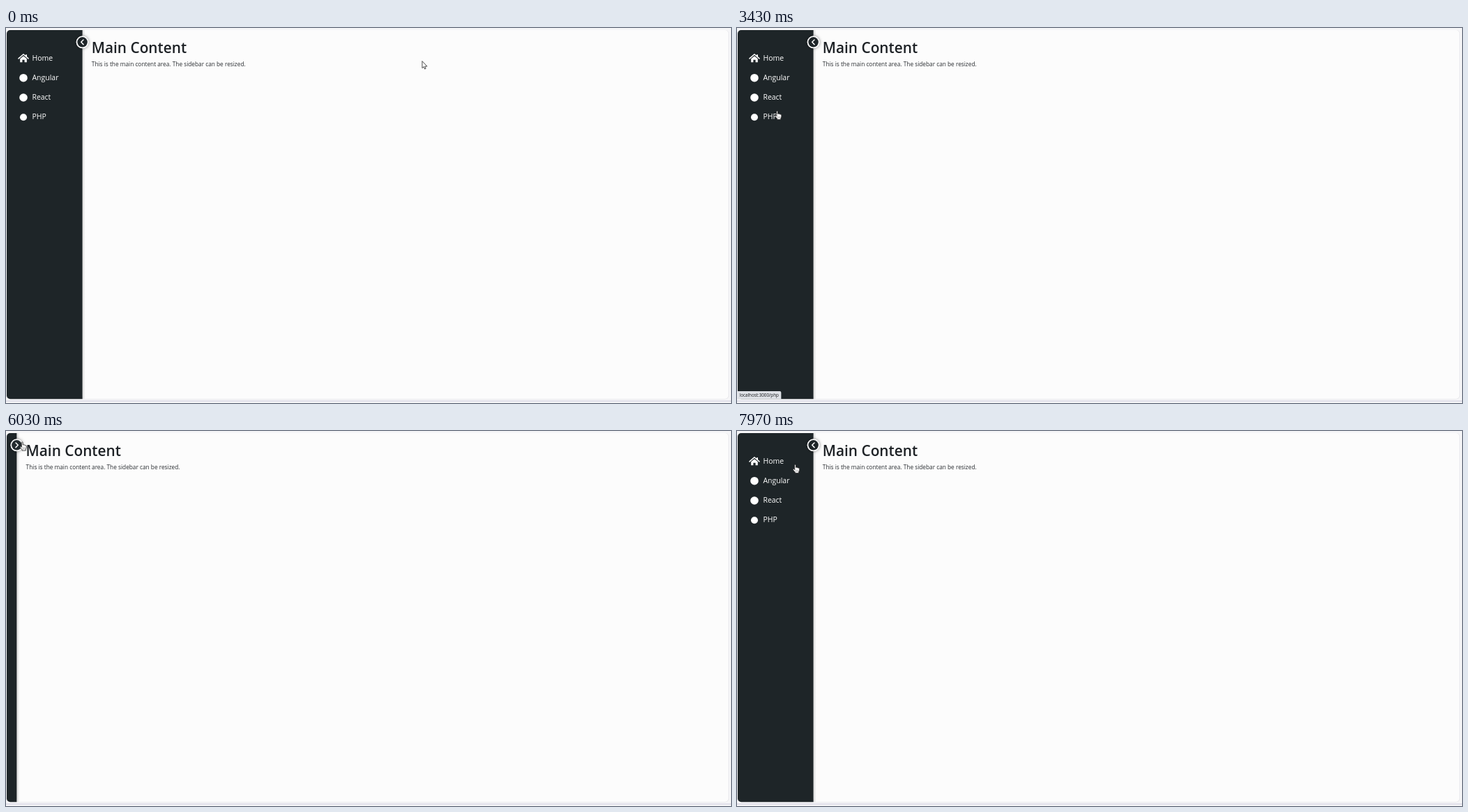
An HTML page with a canvas that plays this animation: 1040 px wide and 539 px high, repeating every 8000 ms.

```html
<!DOCTYPE html>
<html lang="en">
<head>
<meta charset="utf-8">
<title>Resizable sidebar</title>
<style>
html, body { margin: 0; width: 100%; height: 100%; overflow: hidden; background: #f6f6f8; }
canvas { display: block; }
</style>
</head>
<body>
<canvas id="stage" width="1040" height="539"></canvas>
<script>
const ctx = document.getElementById('stage').getContext('2d');
const LOOP = 8000;
const FONT = '"Open Sans", "Noto Sans", sans-serif';
const DARK = '#1e2528';
const OPEN = 109.6, CLOSED = 15.4, TOGGLE_Y = 20.3;
const ITEMS = ['Home', 'Angular', 'React', 'PHP'];
const LINKS = ['about', 'angular', 'react', 'php'];

// Pointer stops: time, x, y
const PATH = [
  [0, 597, 48], [1230, 597, 48], [1900, 66, 52], [2200, 54.5, 44.5],
  [2500, 60, 70], [2900, 56, 98], [3300, 54, 126], [3750, 72, 92],
  [4200, 108, 24], [4530, 111.5, 21], [4830, 113, 22.5], [5250, 113, 22.5],
  [6030, 23.2, 15.5], [6240, 23.2, 16], [6530, 22, 17], [6700, 24, 24],
  [7000, 50, 72], [7400, 58, 126], [7650, 58, 150], [7860, 60, 110],
  [7970, 83.5, 48], [8000, 83.5, 48]
];

const clamp = v => Math.max(0, Math.min(1, v));
const ramp = (t, start, len) => clamp((t - start) / len);
const smooth = p => p * p * (3 - 2 * p);
const mix = (a, b, p) => a + (b - a) * p;

// CSS "ease": cubic-bezier(.25, .1, .25, 1)
function ease(x) {
  const bez = (u, a, b) => 3 * u * (1 - u) * (1 - u) * a + 3 * u * u * (1 - u) * b + u * u * u;
  let lo = 0, hi = 1;
  for (let i = 0; i < 20; i++) {
    const mid = (lo + hi) / 2;
    if (bez(mid, 0.25, 0.25) < x) lo = mid; else hi = mid;
  }
  return bez(lo, 0.1, 1);
}

function pointerAt(t) {
  const i = PATH.findIndex((p, k) => k && t <= p[0]);
  const [t0, x0, y0] = PATH[i - 1], [t1, x1, y1] = PATH[i];
  const p = smooth((t - t0) / (t1 - t0));
  return { x: mix(x0, x1, p), y: mix(y0, y1, p) };
}

function text(str, x, y, size, color, weight = 400) {
  ctx.font = `${weight} ${size}px ${FONT}`;
  ctx.fillStyle = color;
  ctx.fillText(str, x, y);
}

function disc(x, y, r, color) {
  ctx.fillStyle = color;
  ctx.beginPath();
  ctx.arc(x, y, r, 0, 7);
  ctx.fill();
}

function box(x, y, w, h, radii, color) {
  ctx.fillStyle = color;
  ctx.beginPath();
  ctx.roundRect(x, y, w, h, radii);
  ctx.fill();
}

function shape(d, x, y, fill, stroke, width) {
  const path = new Path2D(d);
  ctx.save();
  ctx.translate(x, y);
  ctx.lineJoin = 'round';
  ctx.lineCap = 'round';
  if (fill) { ctx.fillStyle = fill; ctx.fill(path); }
  if (stroke) { ctx.strokeStyle = stroke; ctx.lineWidth = width; ctx.stroke(path); }
  ctx.restore();
}

function drawPage() {
  ctx.fillStyle = '#f6f6f8';
  ctx.fillRect(0, 0, 1040, 539);
  ctx.fillStyle = '#dad9e6';
  ctx.fillRect(0, 535.5, 1040, 1.5);
  box(1, 3, 1036, 530.5, 5, '#e6e6ea');
  box(1, 3, 1035.3, 530, 5, '#fcfcfc');
}

function drawContent(edge) {
  const x = edge + 13.2;
  text('Main Content', x, 36.4, 20.8, '#1d2125', 600);
  text('This is the main content area. The sidebar can be resized.', x, 55, 8.3, '#2a2e32');
}

function drawSidebar(edge) {
  const w = edge - 1;
  const fade = ctx.createLinearGradient(edge, 0, edge + 4, 0);
  fade.addColorStop(0, 'rgba(0,0,0,.14)');
  fade.addColorStop(1, 'rgba(0,0,0,0)');
  ctx.fillStyle = fade;
  ctx.fillRect(edge, 3, 4, 530);
  box(1, 3, w, 530.3, [5, 0, 0, 5], DARK);

  ctx.save();
  ctx.beginPath();
  ctx.rect(1, 3, w, 530);
  ctx.clip();
  shape('M0 6.7 L7 .6 L14 6.7', 18, 37.2, null, '#fff', 1.5);
  shape('M2.2 7.1 L7 3 L11.8 7.1 V12 H8.6 V8.6 H5.4 V12 H2.2 Z M10 1 H12 V5 L10 3.2 Z', 18, 37.2, '#fff');
  disc(25, 71.7, 5.8, '#fff');
  disc(25, 100, 5.8, '#fff');
  disc(25, 128.2, 5, '#fff');
  ITEMS.forEach((name, i) => text(name, 37.4, 46.6 + 28.1 * i, 10.5, '#fff'));
  ctx.restore();
}

function drawToggle(x, hover, closed) {
  const tone = (a, b) => `rgb(${[0, 1, 2].map(i => Math.round(mix(a[i], b[i], hover))).join()})`;
  const dark = [30, 37, 40], light = [252, 252, 252];
  ctx.save();
  ctx.shadowColor = 'rgba(0,0,0,.45)';
  ctx.shadowBlur = 4;
  disc(x, TOGGLE_Y, 9, tone(light, [70, 75, 78]));
  ctx.restore();
  disc(x, TOGGLE_Y, 7.2, tone(dark, light));
  const chevron = closed ? 'M-1.4 -3.3 L1.9 0 L-1.4 3.3' : 'M1.4 -3.3 L-1.9 0 L1.4 3.3';
  shape(chevron, x, TOGGLE_Y, null, tone(light, dark), 1.5);
}

function drawStatus(alpha, link) {
  if (!alpha) return;
  const label = 'localhost:3000/' + link;
  ctx.save();
  ctx.globalAlpha = alpha;
  ctx.font = `400 6.3px ${FONT}`;
  box(0.5, 522, ctx.measureText(label).width + 6.5, 11.5, [0, 2, 0, 0], '#dee1e6');
  text(label, 3.6, 530, 6.3, '#16191c');
  ctx.restore();
}

const CURSORS = {
  arrow: (x, y) => shape('M0 0 V9.6 L2.2 7.6 L3.7 11 L5.2 10.3 L3.8 7.1 H6.7 Z', x, y, '#fff', '#222', 0.8),
  text: (x, y) => shape('M-1.9 -5.8 H-.5 L0 -5.3 L.5 -5.8 H1.9 M0 -5.3 V5.3 M-1.9 5.8 H-.5 L0 5.3 L.5 5.8 H1.9', x, y, null, '#555', 0.9),
  hand: (x, y) => {
    shape('M-.9 .9 Q0 -.6 .9 .9 V4.4 Q2 3.6 2.7 4.7 Q3.8 4.1 4.4 5.2 Q6 4.7 6.1 6.4 V8.8 L5.1 11 V12.6 H-.2 V11.2 L-3.1 7.7 Q-3.3 6.2 -1.9 6.6 L-.9 7.6 Z', x, y, '#fff', '#222', 0.8);
    shape('M1 10.9 V8.2 M2.6 10.9 V8.2 M4.2 10.9 V8.2', x, y, null, '#555', 0.4);
  }
};

function cursorKind({ x, y }, edge) {
  if (Math.hypot(x - edge, y - TOGGLE_Y) < 10) return 'hand';
  if (x < edge) return x > 10 && edge > 100 && y > 29 && y < 141 ? 'hand' : 'arrow';
  const dx = x - edge - 13;
  const onTitle = dx > 0 && dx < 138 && y > 15 && y < 42;
  const onLine = dx > 0 && dx < 222 && y > 46 && y < 58;
  return onTitle || onLine ? 'text' : 'arrow';
}

function draw(t) {
  const shut = ease(ramp(t, 4590, 300)) - ease(ramp(t, 6230, 290));
  const edge = mix(OPEN, CLOSED, shut);
  const hover = ease(ramp(t, 4200, 300)) - ease(ramp(t, 4600, 300))
    + ease(ramp(t, 6020, 300)) * (1 - ease(ramp(t, 6240, 200)));
  const status = ramp(t, 2150, 120) - ramp(t, 4150, 200)
    + ramp(t, 6950, 120) - ramp(t, 7620, 200);
  const p = pointerAt(t);
  const row = Math.max(0, Math.min(3, Math.floor((p.y - 29) / 28.1)));

  drawPage();
  drawContent(edge);
  drawSidebar(edge);
  drawToggle(edge, hover, t > 4590 && t < 6230);
  drawStatus(clamp(status), LINKS[row]);
  CURSORS[cursorKind(p, edge)](p.x, p.y);
}

const start = performance.now();
function tick() {
  draw((performance.now() - start) % LOOP);
  requestAnimationFrame(tick);
}
tick();
</script>
</body>
</html>
```
